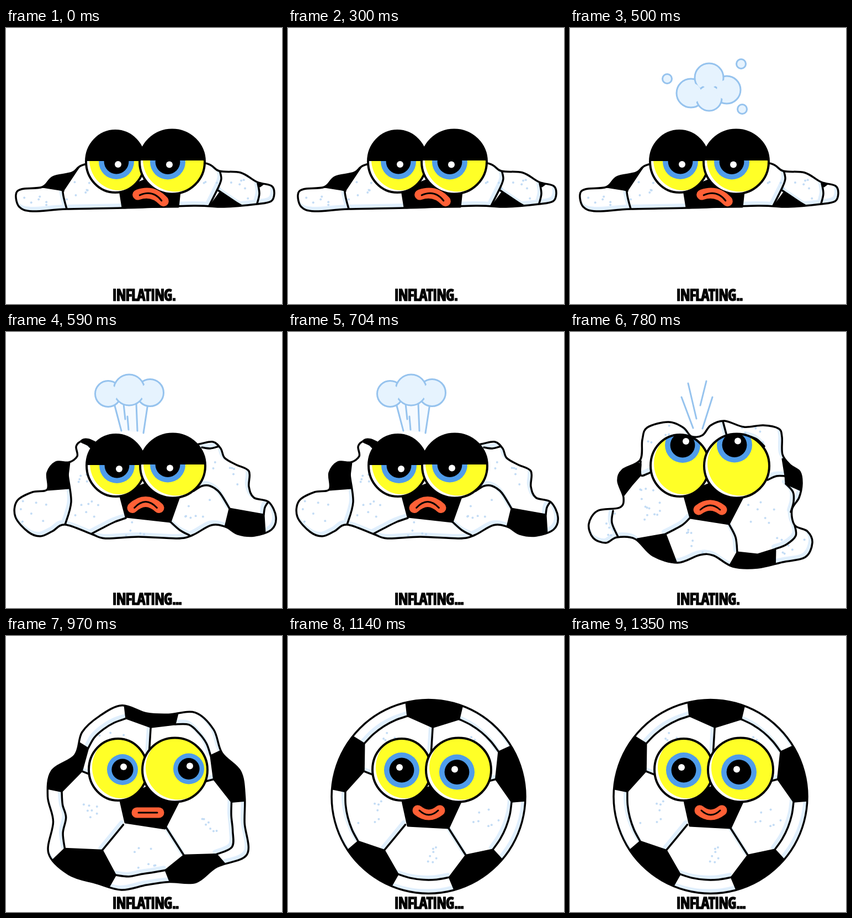
Recreate the animation shown at these times as an HTML page. Size 500 by 500 pixels, loop 1490 ms.

```html
<!DOCTYPE html>
<html lang="en">
<head>
<meta charset="utf-8">
<title>Inflating</title>
<style>
html, body { margin: 0; width: 100%; height: 100%; overflow: hidden; background: #fff; }
svg { display: block; width: 100%; height: 100%; }
text { font-weight: 900; font-stretch: extra-condensed; stroke: #000; }
#word { letter-spacing: -.03em; stroke-width: 1.5; }
.dots { font: 700 30px "Liberation Sans", Arial, sans-serif; letter-spacing: -2.8px; stroke-width: .8; }
</style>
</head>
<body>
<svg id="stage" viewBox="0 0 500 500">
  <text id="word" x="192.5" y="494">INFLATING</text>
</svg>
<script>
const stage = document.getElementById('stage');
const SHADE = '#e0effd', SPECK = '#c3dcf5', YELLOW = '#ffff27', BLUE = '#4f9cea',
      RED = '#ff6036', PUFF = '#e6f3fe', SKY = '#96c3ee';

let seed = 7;
const random = () => (seed = seed * 16807 % 2147483647) / 2147483647;

// Smooth path through points such as "10,20 30,40".
function curve(spec, closed) {
  const p = spec.split(' ').map(s => s.split(',').map(Number)), n = p.length;
  const at = i => closed ? p[(i + n) % n] : p[Math.max(0, Math.min(n - 1, i))];
  let d = 'M' + p[0];
  for (let i = 0; i < (closed ? n : n - 1); i++) {
    const [a, b, c, e] = [-1, 0, 1, 2].map(k => at(i + k));
    d += `C${b.map((v, k) => v + (c[k] - a[k]) / 6)} ${c.map((v, k) => v - (e[k] - b[k]) / 6)} ${c}`;
  }
  return d;
}

const stroke = (d, color = '#000', width = 3.5) =>
  `<path d="${d}" fill="none" stroke="${color}" stroke-width="${width}" stroke-linecap="round" stroke-linejoin="round"/>`;
const line = (spec, color, width) => stroke(curve(spec), color, width);
const poly = pts => `<polygon points="${pts}" stroke="#000" stroke-width="3" stroke-linejoin="round"/>`;
const oval = (x, y, rx, ry, fill, more = '') =>
  `<ellipse cx="${x}" cy="${y}" rx="${rx}" ry="${ry}" fill="${fill}" ${more}/>`;

let ids = 0;
function clip(inner, content) {
  const id = 'c' + ids++;
  return `<clipPath id="${id}">${inner}</clipPath><g clip-path="url(#${id})">${content}</g>`;
}

function scatter(center) {
  const [x, y] = center.split(',').map(Number);
  return Array.from({ length: 7 }, () =>
    oval(x + 50 * (random() - .5), y + 44 * (random() - .5), 2, 2, SPECK)).join('');
}

// Panels get a soft edge: every line repeated in pale blue, up and to the left.
function body({ outline, patches, lines, panels }) {
  const d = curve(outline, true), shape = `<path d="${d}" fill="#fff"/>`;
  return clip(shape, shape
    + `<g transform="translate(-3 -4)">${stroke(d, SHADE, 8)}${lines.map(s => line(s, SHADE, 8)).join('')}</g>`
    + panels.map(scatter).join('') + patches.map(poly).join('')
    + lines.map(s => line(s)).join('')) + stroke(d);
}

function eye(x, y, rx, ry, [ix, iy], [gx, gy], r, lid) {
  const white = oval(x, y, rx, ry, '#fff');
  ix += x;
  iy += y;
  return clip(white, white + oval(x + 6, y - 4, rx, ry, YELLOW)
    + oval(ix, iy, r, r, BLUE) + oval(ix, iy, r * .7, r * .7, '#000')
    + oval(ix + gx, iy + gy, 6, 6, '#fff')
    + (lid ? `<rect x="${x - 70}" y="${lid - 90}" width="140" height="90"/>` : ''))
    + oval(x, y, rx, ry, 'none', 'stroke="#000" stroke-width="4"');
}

function mouth([x, y, half, bend, tilt = 0]) {
  const lip = w => `M${x - w},${y - bend / 2}Q${x},${y + bend * 1.5} ${x + w},${y - bend / 2}`;
  return `<g transform="rotate(${tilt} ${x} ${y})">`
    + stroke(lip(half), '#000', 21) + stroke(lip(half), RED, 19) + stroke(lip(half * .85), '#000', 3) + '</g>';
}

// chin: lower corners of the black patch; left, right: where each eye looks.
function face({ x, chin, left, right, glint, iris = 32, lid, lips }) {
  return poly(`206,294 ${chin} 315,296 260,272`)
    + eye(x, 242, 53, 56, left, glint, iris, lid)
    + eye(x + 103, 242.5, 59, 58, right, glint, iris, lid && lid - 1)
    + mouth(lips);
}

// Ball seen from the front: five patches around the face, rim given as a radius by angle.
function ball(radii) {
  const step = 360 / radii.length;
  const point = (r, deg) => {
    const a = deg * Math.PI / 180;
    return `${(254.5 + r * Math.cos(a)).toFixed(1)},${(291 + r * Math.sin(a)).toFixed(1)}`;
  };
  const rim = deg => {
    const t = (deg + 450) % 360 / step, i = Math.floor(t), n = radii.length;
    return radii[i % n] + (radii[(i + 1) % n] - radii[i % n]) * (t - i);
  };
  const ring = deg => point(rim(deg) * .86, deg);
  const turns = [0, 1, 2, 3, 4].map(i => i * 72 - 86.5);
  return body({
    outline: radii.map((r, i) => point(r, i * step - 90)).join(' '),
    patches: turns.map(a => [point(126, a), ring(a + 18), point(240, a + 15), point(240, a - 15), ring(a - 18)].join(' ')),
    lines: turns.flatMap(a => [
      [18, 27, 36, 45, 54].map(k => ring(a + k)).join(' '),
      `${point(66, a)} ${point(126, a)}`]),
    panels: turns.map(a => point(112, a + 36))
  });
}

// Later lobes lie over earlier ones; the middles hide all but short creases.
const cloud = lobes => lobes.map(([x, y, r]) => oval(x, y, r, r, PUFF, `stroke="${SKY}" stroke-width="3"`)).join('')
  + lobes.map(([x, y, r]) => oval(x, y, r * .72, r * .72, PUFF)).join('');
const streaks = specs => specs.map(s => line(s, SKY, 3)).join('');

const puff = cloud([[219, 118, 26], [284, 112, 25], [252, 90, 26], [252, 127, 23]])
  + cloud([[176, 92, 8.5]]) + cloud([[310, 65, 8.5]]) + cloud([[312, 147, 8.5]]);
const plume = `<path d="M196 130L212 179L249 182L257 130Z" fill="${PUFF}" opacity=".4"/>`
  + streaks(['196,130 209,179', '213,130 216,158', '220,153 222,177', '236,130 238,179', '257,130 249,183'])
  + cloud([[185, 112, 23.5], [261, 110, 24.5], [223, 105, 28]]);
const jets = streaks(['202,118 223,174', '214,93 229,157', '247,89 236,133', '258,118 240,175']);

const flat = body({
  outline: '18,302 28,292 66,288 85,270 120,262 147,246 250,235 357,244 386,259 425,262 455,279 481,286 486,300 480,314 455,319 395,324 340,322 211,326 110,328 48,332 24,324',
  patches: ['66,288 60,250 132,252 104,294', '387,299 366,328 426,328 426,321', '458,278 472,278 460,287'],
  lines: ['132,252 117,270 103,293 110,328', '66,288 86,288 104,295', '387,258 390,273 385,288 366,326', '384,294 402,306 424,321', '456,281 459,300 455,318'],
  panels: ['135,292', '52,307', '365,288', '430,290']
}) + face({
  x: 198, chin: '211,325 312,324', left: [2, 0], right: [-8, 0], glint: [3, 5], lid: 241,
  lips: [263, 304, 24, -8, 14]
});

const slack = body({
  outline: '127,208 134,199 150,195 200,215 300,215 350,203 375,199 389,211 396,228 416,240 440,252 440,280 449,300 476,308 489,335 481,358 450,369 420,366 398,353 372,350 338,368 310,374 240,371 180,374 155,366 107,349 84,361 62,370 40,362 17,335 20,306 48,290 75,285 75,255 90,236 114,236 129,225',
  patches: ['75,286 60,220 115,236 112,260 114,283', '405,320 467,331 470,380 400,380 397,353', '138,200 145,185 164,195 154,207'],
  lines: ['114,236 112,258 118,308 107,349', '150,368 173,356 197,344 217,337', '298,344 315,359 332,368', '340,288 355,279 370,279 387,291 405,320', '355,209 370,211 386,207', '137,199 147,203 153,209', '475,308 469,318 467,331'],
  panels: ['140,270', '145,318', '48,325', '400,258', '350,316', '240,357']
}) + face({
  x: 199, chin: '217,335 298,344', left: [2, 0], right: [-9, -2], glint: [4, 6], lid: 241,
  lips: [253, 313, 24, -11]
});

const lumpy = body({
  outline: '240,187 255,169 280,161 315,172 350,169 378,175 384,190 385,222 399,241 416,253 420,275 415,300 402,322 407,350 430,361 439,382 426,408 385,417 340,427 295,425 260,405 235,404 195,418 150,405 118,375 85,372 65,382 42,373 34,348 50,324 90,318 97,300 87,270 95,250 127,232 131,195 140,173 178,163 205,173 220,189',
  patches: ['94,300 70,270 100,225 128,240 127,260 112,277', '385,230 440,240 425,290 391,275 390,261', '122,375 173,366 192,416 160,440', '303,399 340,403 372,393 371,440 280,440'],
  lines: ['128,234 128,259 140,257 150,252', '78,324 76,346 88,373', '217,337 203,350 173,366', '288,348 300,372 303,399', '358,268 374,261 390,261', '391,275 404,290 405,308 400,326', '407,350 409,369 392,385 372,393', '277,162 284,188', '321,188 338,194 352,207'],
  panels: ['160,190', '325,178', '130,300', '150,330', '58,350', '235,380', '345,325', '400,395']
}) + face({
  x: 199, chin: '218,337 288,348', left: [5, -37], right: [-4, -38], glint: [6, -7],
  lips: [254, 318, 21, -8]
});

// Rim radii clockwise from the top.
const bumpy = ball([151, 154, 176, 172, 158, 176, 178, 184, 210, 180, 179, 160,
                    160, 175, 181, 199, 205, 175, 179, 178, 150, 165, 169, 171])
  + face({
    x: 203, chin: '216,338 288,349', left: [8, 0], right: [25, -2], glint: [2, -5], iris: 28,
    lips: [257, 320, 20, 0]
  });

const round = ball(Array(24).fill(175.5)) + face({
  x: 206, chin: '217,344 291,348', left: [0, 1], right: [-3, 4], glint: [-4, -5],
  lips: [255, 320, 20, 8]
});

// [start ms, art, dots]
const LOOP = 1490;
const steps = [
  [0, flat, '.'],
  [500, flat + puff, '..'],
  [590, plume + slack, '...'],
  [780, jets + lumpy, '.'],
  [970, bumpy, '..'],
  [1140, round, '...']
];

// Use the narrowest heavy face available, sized to sit beside the dots.
const word = document.getElementById('word');
const faces = ['Open Sans Condensed', 'Roboto Condensed', 'Noto Sans', 'Open Sans', 'Roboto', 'Liberation Sans'];
const measure = name => {
  word.style.font = `900 31px "${name}", "Liberation Sans", sans-serif`;
  word.style.fontStretch = 'extra-condensed';
  return word.getComputedTextLength();
};
const best = faces.reduce((a, b) => measure(b) < measure(a) ? b : a);
word.style.fontSize = 31 * Math.min(1, 108 / measure(best)) + 'px';

steps.forEach(([start, art, dots], i) => {
  const g = document.createElementNS('http://www.w3.org/2000/svg', 'g');
  g.innerHTML = art + `<text class="dots" x="300.5" y="494">${dots}</text>`;
  stage.insertBefore(g, word);
  const end = i + 1 < steps.length ? steps[i + 1][0] : LOOP;
  const frames = [{ offset: start / LOOP, opacity: 1 }];
  if (start) frames.unshift({ offset: 0, opacity: 0 });
  if (end < LOOP) frames.push({ offset: end / LOOP, opacity: 0 });
  frames.push({ offset: 1, opacity: end < LOOP ? 0 : 1 });
  frames.forEach(f => f.easing = 'step-end');
  g.animate(frames, { duration: LOOP, iterations: Infinity });
});
</script>
</body>
</html>
```
